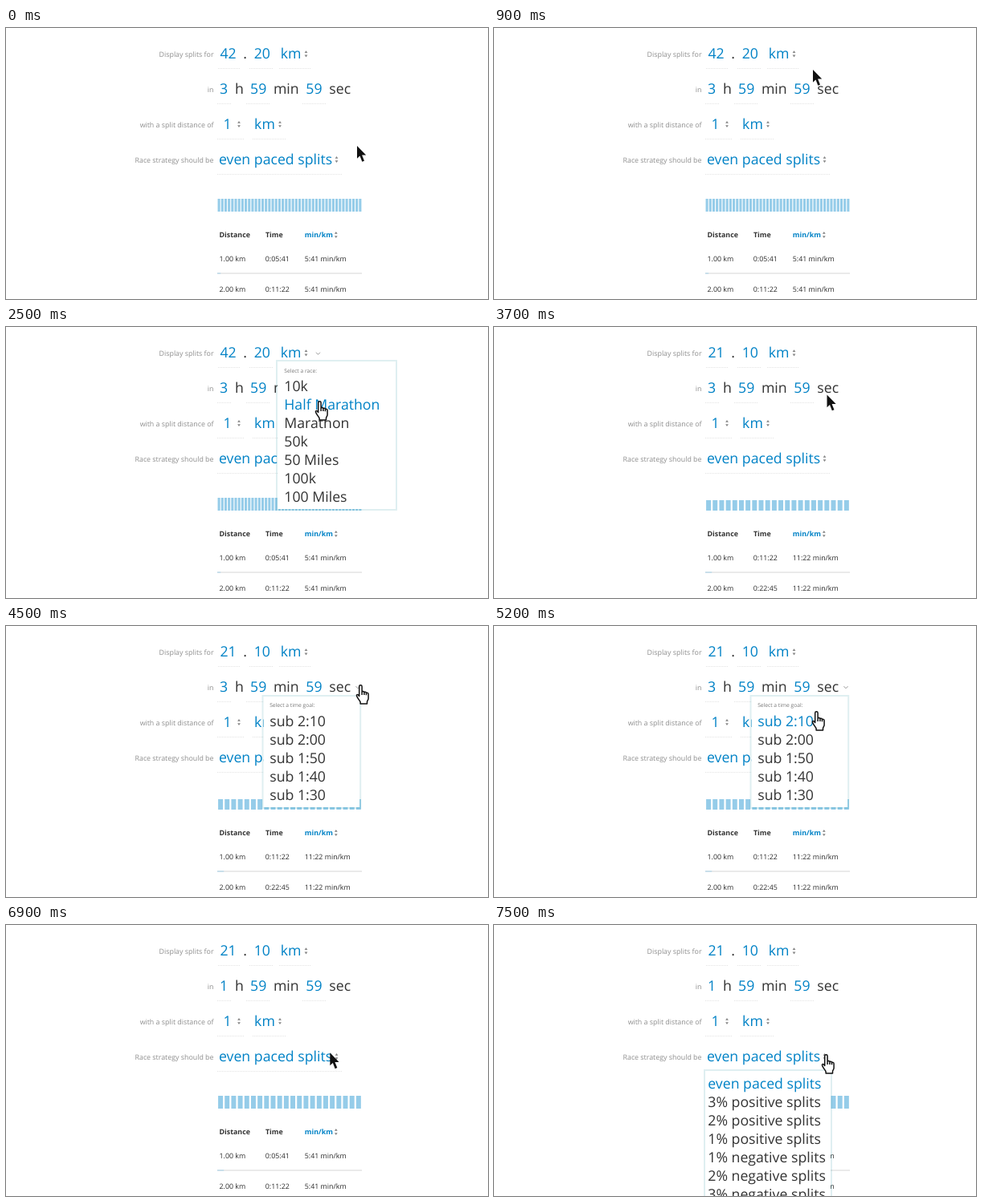
Recreate the animation shown at these times as an HTML page. Size 600 px wide and 338 px high, loop 8000 ms.

```html
<!DOCTYPE html>
<html lang="en">
<head>
<meta charset="utf-8">
<title>Race splits</title>
<style>
  html, body { margin: 0; width: 100%; height: 100%; overflow: hidden; background: #fff; }
  svg { display: block; }
  text { font: 17.7px "Open Sans", sans-serif; fill: #333; white-space: pre; text-rendering: geometricPrecision; }
  .blue { fill: #0082c6; }
  .label { font-size: 8.85px; fill: #8e8e8e; text-anchor: end; }
  .cell { font-size: 8.85px; fill: #2a2a2a; }
  .head { font-size: 8.85px; font-weight: 700; }
  .hint { font-size: 6.7px; fill: #777; }
</style>
</head>
<body>
<svg id="stage" width="600" height="338" viewBox="0 0 600 338"></svg>
<script>
const LOOP = 8000, STEP = 100;
const stage = document.getElementById('stage');

// The pointer makes one six-step move every 1500 ms, starting at 500 ms.
const stops = [[437, 147], [389, 33], [389, 94], [440, 75], [360, 141], [412, 163]];

const menus = [
  { x: 337, y: 42, w: 149, h: 186, tx: 346.3, base: 80.3, hint: 'Select a race:', chevron: [388.5, 33],
    items: ['10k', 'Half Marathon', 'Marathon', '50k', '50 Miles', '100k', '100 Miles'] },
  { x: 319.5, y: 87, w: 121.7, h: 140, tx: 328.2, base: 125, hint: 'Select a time goal:', chevron: [438, 76.5],
    items: ['sub 2:10', 'sub 2:00', 'sub 1:50', 'sub 1:40', 'sub 1:30'] },
  { x: 262, y: 181, w: 158, h: 170, tx: 266.3, base: 204.4, selected: 0,
    items: ['even paced splits', '3% positive splits', '2% positive splits', '1% positive splits',
            '1% negative splits', '2% negative splits', '3% negative splits'] }
];

const text = (x, y, s, cls = '') => `<text x="${x}" y="${y}" class="${cls}">${s}</text>`;
const blue = (x, y, s) => text(x, y, s, 'blue');
const rect = (x, y, w, h, fill) => `<rect x="${x}" y="${y}" width="${w}" height="${h}" fill="${fill}"/>`;
const rule = (x1, x2, y) => `<path d="M${x1} ${y}H${x2}" stroke="#e3e3e3" stroke-dasharray="1 1"/>`;
const sorter = (x, y) => `<path d="M${x - 1.9} ${y - 1.3}l1.9-2.8 1.9 2.8zM${x - 1.9} ${y + 1.3}l1.9 2.8 1.9-2.8z" fill="#858585"/>`;
const pad = n => String(n).padStart(2, '0');

function clock(sec, withHours) {
  const s = Math.round(sec), m = Math.floor(s / 60);
  return withHours ? `${Math.floor(m / 60)}:${pad(m % 60)}:${pad(s % 60)}` : `${m}:${pad(s % 60)}`;
}

function form(dist, hours) {
  const [whole, part] = dist.toFixed(2).split('.');
  const labels = [['Display splits for', 36], ['in', 80], ['with a split distance of', 123.7], ['Race strategy should be', 167.5]];
  const rules = [[264, 292, 50], [303, 332, 50], [340, 380, 50], [263, 281, 94], [299, 329, 94],
                 [369, 399, 94], [263, 296, 138], [307, 348, 138], [263, 418, 182]];
  return labels.map(([s, y]) => text(258.5, y, s, 'label')).join('') +
    rules.map(([a, b, y]) => rule(a, b, y + .5)).join('') +
    blue(266.5, 38, whole) + text(295.2, 38, '.') + blue(308.7, 38, part) + blue(341.7, 38, 'km') + sorter(373.5, 32.3) +
    blue(266.1, 82, hours) + text(284.9, 82, 'h') + blue(304.1, 82, '59') + text(332.9, 82, 'min') +
    blue(373.3, 82, '59') + text(402.3, 82, 'sec') +
    blue(270.4, 126, '1') + sorter(290, 120) + blue(309.1, 126, 'km') + sorter(341, 120) +
    blue(265, 169.5, 'even paced splits') + sorter(411.5, 164);
}

function table(dist, hours) {
  const pace = (hours * 3600 + 59 * 60 + 59) / dist;
  const count = Math.ceil(dist), pitch = 180 / count;
  const top = pace > 600 ? 216 : 213;
  let out = '';
  for (let i = 0; i < count; i++) out += rect(263 + pitch * (i + .13), top, pitch * .73, 229 - top, '#95cce9');
  out += text(265.5, 261, 'Distance', 'head') + text(323, 261, 'Time', 'head') +
    text(371.8, 261, 'min/km', 'head blue') + sorter(410.8, 258) +
    rect(263, 305.5, 180, 1, '#d6d6d6') + rect(263, 305.5, pitch, 1, '#a9d5ec');
  [1, 2].forEach(km => {
    const y = 252.2 + 38.3 * km;
    out += text(265.5, y, km.toFixed(2) + ' km', 'cell') + text(322.8, y, clock(pace * km, true), 'cell') +
      text(371.8, y, clock(pace) + ' min/km', 'cell');
  });
  return out;
}

// The border is translucent, so the bars show through it.
function menu(m, pointerY) {
  const hot = m.selected ?? Math.floor((pointerY - m.base + 18) / 23);
  let out = rect(m.x + 1, m.y + 1, m.w - 2, m.h - 2, '#fff') +
    `<rect x="${m.x}" y="${m.y}" width="${m.w}" height="${m.h}" fill="none" stroke="#0f8296" stroke-opacity=".13" stroke-width="2"/>`;
  if (m.hint) out += text(m.tx, m.base - 23.6, m.hint, 'hint');
  if (m.chevron) out += `<path d="M${m.chevron[0] - 2.5} ${m.chevron[1] - 1.3}l2.5 2.6 2.5-2.6" fill="none" stroke="#999"/>`;
  return out + m.items.map((s, i) => text(m.tx, m.base + 23 * i, s, i === hot ? 'blue' : '')).join('');
}

function pointer(x, y, hand) {
  return hand
    ? `<path transform="translate(${x - 4.5} ${y - 2})" fill="#fff" stroke="#111" stroke-width="1.5" stroke-linejoin="round"
        d="M4.2 14.5V2.5a1.7 1.7 0 0 1 3.4 0V9.5c.3-1.3 2.6-1.2 2.8.4c.5-1 2.5-.8 2.6.8c.6-.8 2.6-.5 2.6 1.2v5.4
        c0 2-1.4 2.8-1.6 4.2V24H5.6V21.8C4.6 19.8 2.5 17.6 1.2 14.6c-.9-1.8.8-2.8 1.9-1.6zM7.6 9.5v3.4M10.4 9.9v3M13 10.7v2.6"/>`
    : `<path transform="translate(${x} ${y})" fill="#111" d="M0 0V15.8L3.5 12.6 6.3 19.8 9 18.7 6.1 11.6H11.2z"/>`;
}

function pointerAt(t) {
  const i = Math.floor((t - 500) / 1500);
  if (i < 0) return stops[0];
  const p = Math.min(6, Math.floor((t - 500 - 1500 * i) / STEP) + 1) / 6;
  return stops[i].map((v, k) => v + ((stops[i + 1] ?? stops[i])[k] - v) * p);
}

let shown = -1;
function draw() {
  const t = Math.floor(performance.now() % LOOP / STEP) * STEP;
  if (t !== shown) {
    shown = t;
    const dist = t < 3000 ? 42.2 : 21.1, hours = t < 6000 ? 3 : 1;
    const [x, y] = pointerAt(t), phase = t % 3000;
    stage.innerHTML = form(dist, hours) + table(dist, hours) +
      (phase >= 1500 ? menu(menus[Math.floor(t / 3000)], y) : '') +
      pointer(x, y, phase >= 1000);
  }
  requestAnimationFrame(draw);
}
draw();
</script>
</body>
</html>
```
